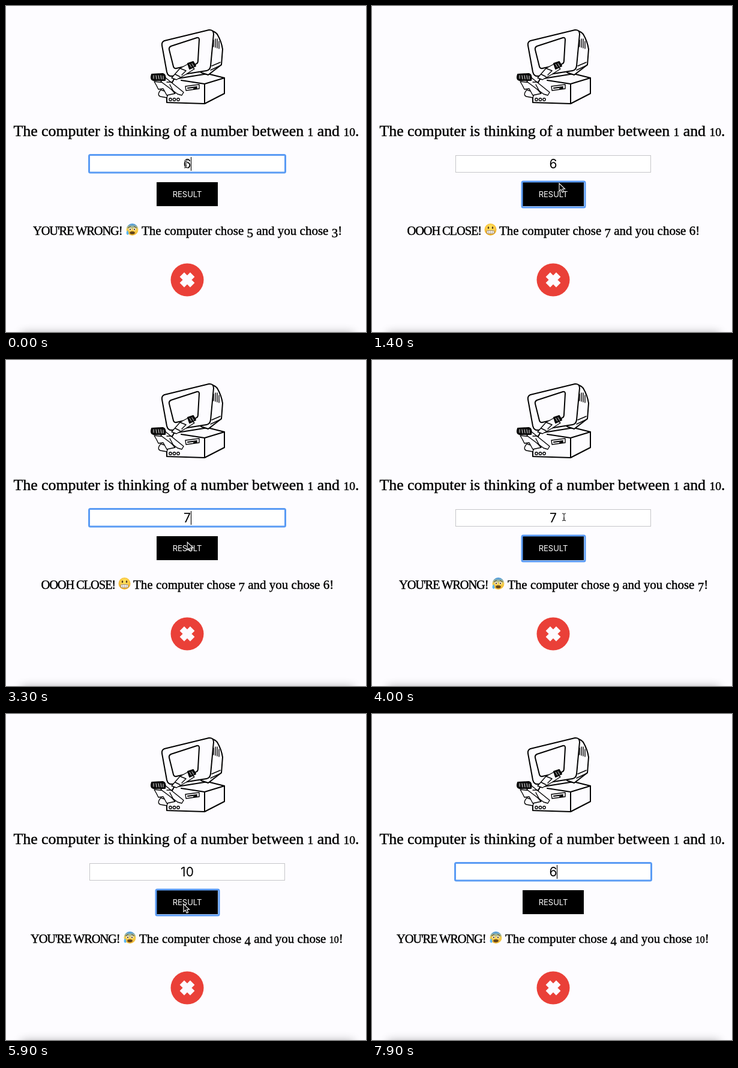
These frames come from a looping animation (600 by 544 pixels, 8 s). An HTML page:

```html
<!DOCTYPE html>
<html lang="en">
<head>
<meta charset="utf-8">
<title>Guess the number</title>
<style>
  html, body { margin: 0; width: 100%; height: 100%; overflow: hidden; background: #fdfcff; }
  svg { display: block; width: 600px; height: 544px; }
  .slab { font-family: "Liberation Serif", Tinos, serif; stroke: #000; stroke-width: .45px; white-space: pre; }
  .sans { font-family: Inter, "Liberation Sans", sans-serif; text-anchor: middle; }
  .ink { fill: #fdfcff; stroke: #000; stroke-width: 2; stroke-linejoin: round; stroke-linecap: round; }
  .thin { stroke-width: 1.4; }
  .ring { fill: none; stroke: #5a9bf4; stroke-width: 3; }
</style>
</head>
<body>
<svg viewBox="0 0 600 544">
  <defs>
    <filter id="blur" x="-20%" y="-100%" width="140%" height="300%"><feGaussianBlur stdDeviation="8"/></filter>
    <linearGradient id="chill" x2="0" y2="1">
      <stop offset=".05" stop-color="#4d9be0"/><stop offset=".5" stop-color="#f6cf4c"/><stop offset="1" stop-color="#f2b632"/>
    </linearGradient>
    <radialGradient id="sun" cy=".4"><stop offset=".4" stop-color="#ffe05a"/><stop offset="1" stop-color="#f5b52f"/></radialGradient>
  </defs>

  <rect x="26" y="546" width="553" height="30" fill="#000" opacity=".35" filter="url(#blur)"/>

  <g class="ink">
    <!-- case -->
    <path d="M280 122 336 113 364 120V146L331 163 268 161V144Z"/>
    <path d="M292 124 331 130 364 120M331 130V163" fill="none"/>
    <!-- monitor -->
    <path d="M338 41Q347 41 352 47 359 59 361 72L359 98 337 115 325 111Z"/>
    <path d="M264 58Q259 60 260 66L268 110Q270 118 277 117L334 108Q340 107 341 100L346 47Q346 39 338 40Z"/>
    <path d="M275 67Q271 69 272 73L279 101Q280 105 284 104L316 97Q320 96 320 91L322 56Q322 52 318 53Z"/>
    <path class="thin" d="M346 57V68M349 55V69M352 55V70M355 59V71M343 100 357 94M341 107 358 99" fill="none"/>
    <!-- drive and knobs -->
    <path class="thin" d="M299 134 322 131V138L300 141Z"/>
    <path d="M303 137 318 135M313 138 318 137"/>
    <g class="thin"><circle cx="274" cy="156" r="2.2"/><circle cx="280.500" cy="156" r="2.2"/><circle cx="287" cy="156" r="2.2"/></g>
    <!-- upper hand -->
    <path class="thin" d="M303 97 290 104 276 120 284 123 300 114 314 105Z"/>
    <path class="thin" d="M290 104 300 108 293 115M282 114 290 118" fill="none"/>
    <path d="M303 96 312 93 316 100 306 105Z" fill="#111"/>
    <path d="M306 97 309 102M310 96 313 101" stroke="#fff" stroke-width=".8"/>
    <!-- lower hand -->
    <path class="thin" d="M258 140Q251 148 257 151L268 153 271 144Z"/>
    <path class="thin" d="M247 126 265 128 282 146 268 149 262 138 254 139 251 133Z"/>
    <path class="thin" d="M265 119 296 144 293 149 286 147 258 126Z"/>
    <path class="thin" d="M268 127 276 127M273 131 281 146" fill="none"/>
    <path d="M243 114Q240 123 246 124L265 124Q267 114 261 113Z" fill="#111"/>
    <path d="M246 116V121M250 116 251 122M254 116 255 122M258 116 259 122M262 117V122" stroke="#fff" stroke-width=".9"/>
  </g>

  <text class="slab" id="title" x="12.500" y="217" font-size="25.8"></text>

  <rect x="139.500" y="249.500" width="325" height="28" fill="#fff" stroke="#c6c6c9"/>
  <rect class="ring" id="inputRing" x="138.500" y="248.500" width="327" height="29.500" rx="2"/>
  <text class="sans" id="value" x="302" y="271" font-size="21"></text>
  <path id="caret" d="M0 252V275" stroke="#000" stroke-width="1.1"/>

  <rect x="251" y="294" width="102" height="40"/>
  <rect class="ring" id="buttonRing" x="250" y="293" width="105" height="43" rx="2"/>
  <text class="sans" x="302" y="319.200" font-size="13" fill="#fff">RESULT</text>

  <text class="slab" id="verdict" y="381.500" font-size="20.5" letter-spacing="-1.15"></text>
  <text class="slab" id="detail" y="381.500" font-size="21"></text>

  <g id="worried">
    <circle r="10" fill="url(#chill)"/>
    <g fill="none" stroke="#62451b" stroke-linecap="round">
      <path d="M-7-3-3-5M7-3 3-5"/><ellipse cy="5.500" rx="4" ry="2" fill="#62451b"/>
    </g>
    <g fill="#fff"><circle cx="-3.500" cy="-.5" r="2.200"/><circle cx="3.500" cy="-.5" r="2.200"/></g>
    <g fill="#52381b"><circle cx="-3.500" cy="-.3" r="1.200"/><circle cx="3.500" cy="-.3" r="1.200"/></g>
    <path d="M-8 1Q-12 7-8 9-4 8-8 1" fill="#58b5f2"/>
  </g>
  <g id="grimace">
    <circle r="10" fill="url(#sun)"/>
    <g fill="#5a3b18"><ellipse cx="-3.500" cy="-3" rx="1.300" ry="1.900"/><ellipse cx="3.500" cy="-3" rx="1.300" ry="1.900"/></g>
    <rect x="-6.500" y="1.500" width="13" height="5.500" rx="2.700" fill="#fff" stroke="#80643c" stroke-width=".8"/>
    <path d="M-6 4.200H6M-3 2V7M0 2V7M3 2V7" stroke="#a59376" stroke-width=".6"/>
  </g>

  <circle cx="302" cy="457" r="27.500" fill="#ea4038"/>
  <path d="M293.300 448.300 310.700 465.700M310.700 448.300 293.300 465.700" stroke="#fdfaff" stroke-width="10.500"/>

  <g id="arrow">
    <path d="M0 0V13L3 10.200 5.200 15 7.600 14 5.500 9.300H9.500Z" stroke="#fff" stroke-width="1.100"/>
  </g>
  <g id="beam" fill="none">
    <path d="M-3-6Q0-6 0-4 0-6 3-6M0-4V4M-3 6Q0 6 0 4 0 6 3 6M-1.500 2H1.500" stroke="#fff" stroke-width="2.600"/>
    <path d="M-3-6Q0-6 0-4 0-6 3-6M0-4V4M-3 6Q0 6 0 4 0 6 3 6M-1.500 2H1.500" stroke="#222" stroke-width="1.100"/>
  </g>
</svg>
<script>
const LOOP = 8000, STEP = 100;
const $ = id => document.getElementById(id);
const show = (id, on) => { $(id).style.display = on ? '' : 'none'; };
const move = (id, x, y) => $(id).setAttribute('transform', `translate(${x} ${y})`);

// Old-style figures: 0 and 1 are small, 3, 4, 5, 7 and 9 hang below the line.
const oldStyle = s => s.replace(/[01]/g, '<tspan font-size="76%">$&</tspan>')
                       .replace(/([34579])(?=[ !])/g, '<tspan baseline-shift="-4">$1</tspan>');

const wrong = "YOU'RE WRONG!", close = 'OOOH CLOSE!';
const rounds = [
  { verdict: wrong, x: 45, face: 210.5, detailX: 226, picked: 5, guess: 3 },
  { verdict: close, x: 58.5, face: 197.5, detailX: 212, picked: 7, guess: 6 },
  { verdict: wrong, x: 45, face: 210.5, detailX: 226, picked: 9, guess: 7 },
  { verdict: wrong, x: 41, face: 206.5, detailX: 222, picked: 4, guess: 10 }
];

// time, typed value, input focused, round
const states = [
  [0, '6', true, 0], [500, '6', false, 1],
  [1800, '6', true, 1], [2500, '', true, 1], [2900, '7', true, 1], [3600, '7', false, 2],
  [4300, '7', true, 2], [4400, '', true, 2], [4800, '1', true, 2], [5300, '10', true, 2], [5700, '10', false, 3],
  [6700, '10', true, 3], [7000, '', true, 3], [7500, '6', true, 3]
];

// time, x, y of the pointer
const path = [
  [0, 300, 264], [100, 300, 264], [400, 293, 317], [1000, 293, 317], [1400, 312, 296], [1600, 312, 296],
  [1800, 323, 267], [3100, 323, 267], [3400, 295, 317], [3700, 295, 317], [3900, 320, 262],
  [5300, 320, 262], [5600, 296, 317], [6200, 296, 317], [6500, 325, 268], [LOOP, 325, 268]
];
const typing = [[2500, 3100], [4400, 5300], [7000, LOOP]];

function pointerAt(t) {
  const i = path.findIndex(p => p[0] > t);
  const [t0, x0, y0] = path[i - 1], [t1, x1, y1] = path[i];
  const k = (t - t0) / (t1 - t0), e = k * k * (3 - 2 * k);
  return [x0 + (x1 - x0) * e, y0 + (y1 - y0) * e];
}

let shownRound = -1;
function drawRound(n) {
  if (n === shownRound) return;
  shownRound = n;
  const r = rounds[n];
  $('verdict').textContent = r.verdict;
  $('verdict').setAttribute('x', r.x);
  $('detail').innerHTML = oldStyle(`The computer chose ${r.picked} and you chose ${r.guess}!`);
  $('detail').setAttribute('x', r.detailX);
  const face = r.verdict === wrong ? 'worried' : 'grimace';
  show('worried', face === 'worried');
  show('grimace', face === 'grimace');
  move(face, r.face, 373);
}

function draw(t) {
  const [since, value, focused, round] = states.findLast(s => s[0] <= t);
  drawRound(round);
  $('value').textContent = value;
  show('inputRing', focused);
  show('buttonRing', !focused);
  show('caret', focused && (t - since) % 1000 < 500);
  move('caret', 302 + [0, 6.5, 12][value.length] - (value === '1' ? 2 : 0), 0);

  const [x, y] = pointerAt(t);
  const visible = !typing.some(([a, b]) => t >= a && t < b);
  const overInput = y < 278;
  show('beam', visible && overInput);
  show('arrow', visible && !overInput);
  move('beam', x, y);
  move('arrow', x, y);
}

$('title').innerHTML = oldStyle('The computer is thinking of a number between 1 and 10.');
const start = performance.now();
function tick() {
  const t = (performance.now() - start) % LOOP;
  draw(Math.floor(t / STEP) * STEP);
  requestAnimationFrame(tick);
}
tick();
</script>
</body>
</html>
```
